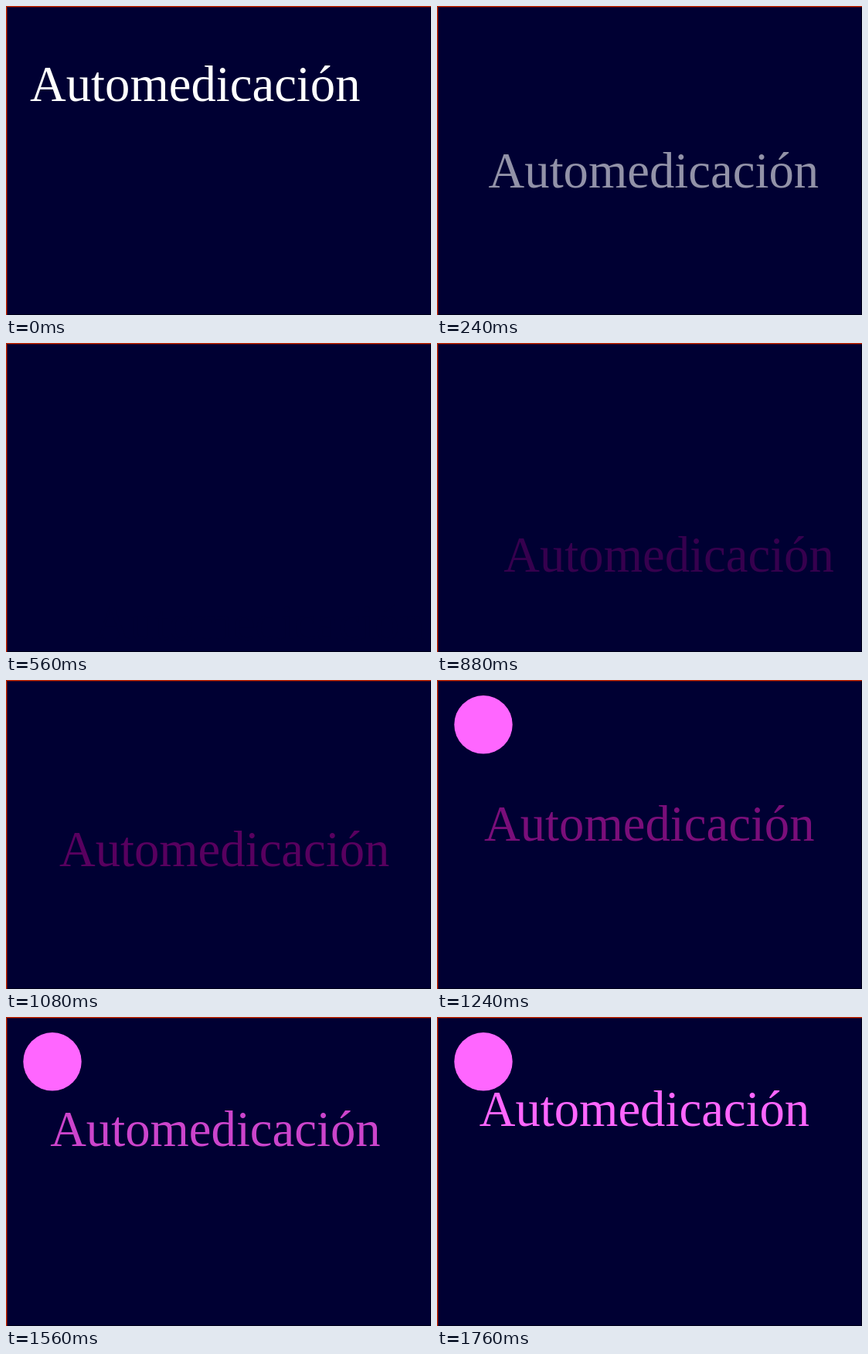
Animation of 550x400 px, one loop 1.8 s. Source, as an HTML page:

```html
<!DOCTYPE html>
<html lang="es">
<head>
<meta charset="utf-8">
<title>Automedicación</title>
<style>
  html, body { margin: 0; width: 100%; height: 100%; overflow: hidden; background: #000033; }
  svg { display: block; }
  text { font: 64.7px "Liberation Serif", "Times New Roman", serif; }
</style>
</head>
<body>
<svg width="550" height="400" viewBox="0 0 550 400">
  <rect width="550" height="400" fill="#000033"/>
  <path d="M0 399.5H549.5V0" fill="none" stroke="#000018"/>
  <path d="M1.5 400V1.5H550" fill="none" stroke="#4a0a1c"/>
  <path d="M.5 400V.5H550" fill="none" stroke="#cc2900"/>
  <circle id="dot" cx="60" cy="57.8" r="37.7" fill="#ff66ff"/>
  <text id="word">Automedicación</text>
</svg>
<script>
const STEP = 40, STEPS = 45;
const word = document.getElementById("word");
const dot = document.getElementById("dot");

// The word glides evenly from pose to pose: out of sight, back in, then brighter.
const poses = [
  { step: 0, x: 31, y: 123, color: 0xffffff },
  { step: 14, x: 114, y: 384, color: 0x000033 },
  { step: 29, x: 62, y: 218.5, color: 0x660066 },
  { step: 44, x: 54.7, y: 140.5, color: 0xff66ff }
];
const dotStart = poses[2].step;

const mix = (a, b, part) => a + (b - a) * part;
const channel = (color, shift) => color >> shift & 255;

function mixColor(a, b, part) {
  const parts = [16, 8, 0].map(shift =>
    Math.round(mix(channel(a, shift), channel(b, shift), part)));
  return `rgb(${parts})`;
}

function draw(ms) {
  const step = Math.floor(ms / STEP) % STEPS;
  const next = Math.max(1, poses.findIndex(pose => pose.step >= step));
  const from = poses[next - 1], to = poses[next];
  const part = (step - from.step) / (to.step - from.step);

  const x = mix(from.x, to.x, part), y = mix(from.y, to.y, part);
  word.setAttribute("transform", `translate(${x} ${y})`);
  word.setAttribute("fill", mixColor(from.color, to.color, part));
  dot.setAttribute("visibility", step >= dotStart ? "visible" : "hidden");
}

const start = performance.now();
function tick() {
  draw(performance.now() - start);
  requestAnimationFrame(tick);
}
tick();
</script>
</body>
</html>
```
